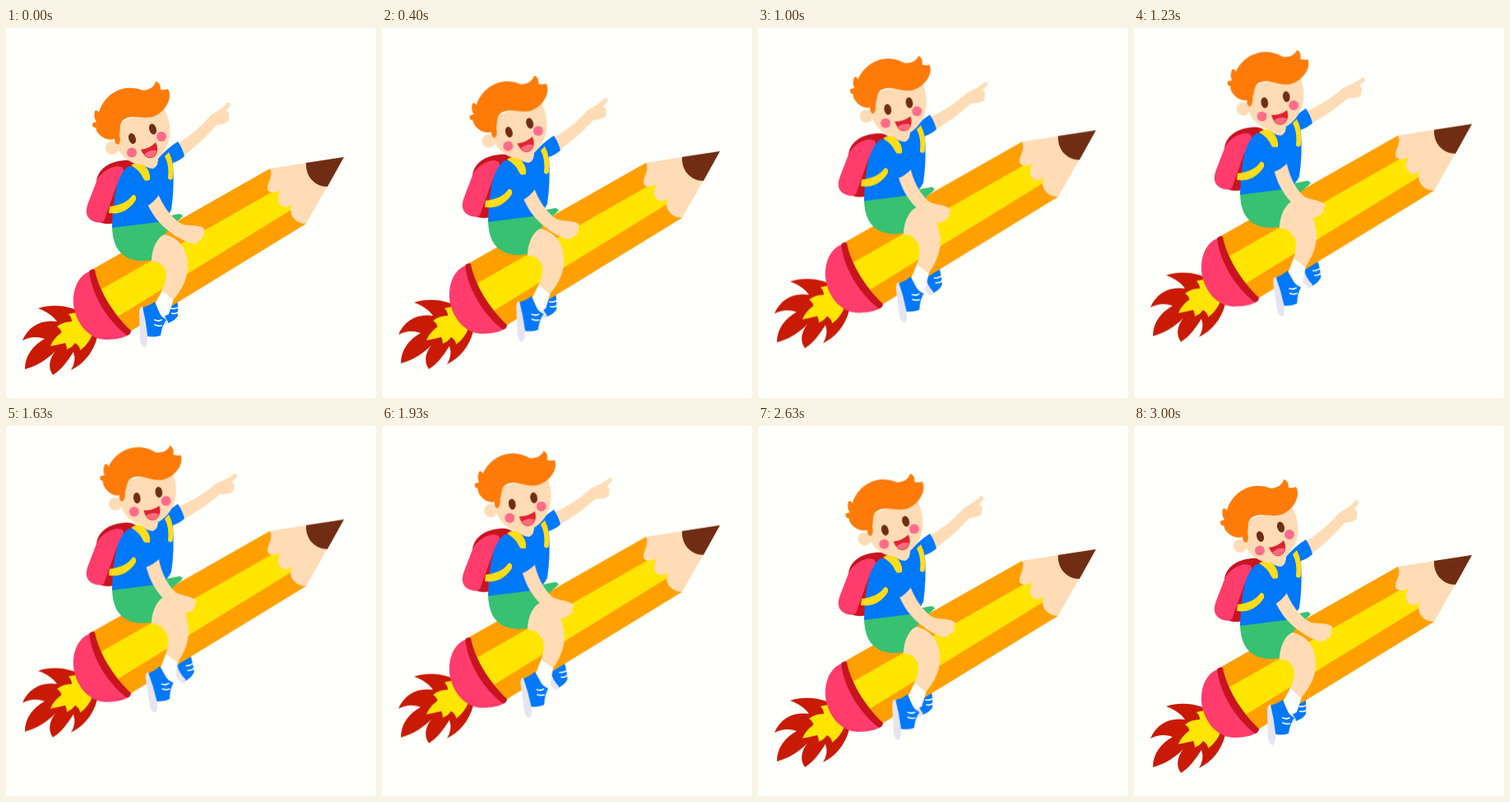
Write an HTML page that moves like this. It is 450 px wide and 450 px high and loops after 3.03 s.

```html
<!DOCTYPE html>
<html lang="en">
<head>
<meta charset="utf-8">
<title>Pencil rocket</title>
<style>
  html, body { margin: 0; width: 100%; height: 100%; overflow: hidden; background: #fffffb; }
  svg { display: block; width: 100vw; height: 100vh; }

  /* Every part swings between two poses on the same sine-like beat. */
  .part {
    --rise: 0px;
    --turn: 0deg;
    transform-box: view-box;
    animation: swing 1515ms cubic-bezier(.364, 0, .636, 1) infinite alternate;
  }
  @keyframes swing {
    from { transform: none; }
    to { transform: translateY(var(--rise)) rotate(var(--turn)); }
  }
  #rider { --rise: -44px; }
  #head { --turn: 10deg; transform-origin: 177px 166px; }
  #farArm { --turn: 9deg; transform-origin: 205px 150px; }
  #nearArm { --turn: 12deg; transform-origin: 176px 205px; }
  #shin { --turn: -7deg; transform-origin: 205px 283px; }
  #farFoot { --turn: -10.5deg; --rise: -6px; transform-origin: 209px 240px; }

  .skin { fill: #ffdcb5; }
  .blue { fill: #0078fa; }
  .green { fill: #37c171; }
  .hair { fill: #ff7b09; }
  .orange { fill: #ffa000; }
  .yellow { fill: #ffe500; }
  .strap { fill: #ffdd17; }
  .pink { fill: #ff3c6c; }
  .crimson { fill: #c8141e; }
  .brown { fill: #702d14; }
  .fire { fill: #c91a05; }
  .white { fill: #fff; }
  .sole { fill: #e6e4ee; }
  .cheek { fill: #ff6c8a; }
  .lace { fill: none; stroke: #fff; stroke-width: 1.8; stroke-linecap: round; }
</style>
</head>
<body>
<svg viewBox="0 0 450 450" aria-label="A boy riding a pencil rocket">
  <g id="rider" class="part">

    <g id="farFoot" class="part">
      <path class="blue" d="M188 335L208 328Q210 339 209 350Q207 355 197 359L189 354Z"/>
      <path class="sole" d="M185 337Q188 333 190 338Q191 349 197 357Q197 362 192 361Q184 352 185 337Z"/>
      <path class="lace" d="M201 341q4 1 8-1M202 347q4 1 7-1"/>
    </g>

    <!-- exhaust -->
    <path class="fire" d="M98 350C84 339 60 334 39 341C50 345 57 350 62 357C43 354 27 363 20 380
      C30 375 38 375 47 378C33 386 23 398 23 415C38 411 50 403 60 393C52 403 51 414 57 422
      C67 416 75 405 82 394Q86 405 79 416C94 409 106 395 111 376Z"/>
    <path class="yellow" d="M100 350C93 346 86 345 76 348C79 351 80 354 80 357C73 357 67 359 62 363
      C66 366 68 369 67 371C61 375 57 380 54 387C61 386 67 384 72 383Q74 387 74 391
      C79 389 82 386 84 383Q90 387 90 392C97 387 102 380 105 373Z"/>

    <!-- pencil -->
    <path class="orange" d="M106 293L321 171L365 238L151 369Q115 337 106 293Z"/>
    <path class="yellow" d="M110 321L333 194L352 218L131 354Z"/>
    <path class="skin" d="M321 171L411 157L365 238C352 238 342 227 348 213Q344 219 337 217
      C330 214 329 206 334 197Q326 203 319 198C315 190 326 182 321 171Z"/>
    <path class="brown" d="M365 164L411 157L391 193C375 193 364 180 365 164Z"/>
    <path class="pink" d="M102 296C87 301 79 321 83 342C88 364 104 379 122 379C136 379 146 376 150 372
      C127 353 109 325 105 296Z"/>
    <path class="crimson" d="M101 296Q104 292 108 294C112 317 130 348 152 368Q152 373 147 374
      C123 355 105 326 101 296Z"/>

    <!-- backpack -->
    <path class="crimson" d="M110 186C112 172 124 163 143 161Q155 160 160 166L136 236Q122 241 112 235Z"/>
    <path class="pink" d="M142 170C146 176 138 185 134 193L119 235Q114 238 109 236C96 232 96 222 101 210
      L111 184C119 172 134 165 142 170Z"/>

    <g id="farArm" class="part">
      <path class="skin" d="M202 145C220 134 237 121 248 107C254 102 264 98 269 91Q273 89 273 94
        L268 101Q273 104 271 108Q273 113 268 115Q262 118 256 118C244 132 230 145 213 158Z"/>
    </g>

    <path class="green" d="M129 240L185 231L211 226Q217 228 213 231Q199 242 191 254Q181 266 178 282
      Q161 285 149 280Q129 271 129 240Z"/>

    <!-- shirt -->
    <path class="blue" d="M149 168Q165 170 184 160Q195 147 209 138Q215 147 217 156Q210 162 203 164
      Q205 195 201 221Q196 232 185 236L129 243Q130 207 136 188Q141 174 149 168Z"/>
    <path class="skin" d="M164 164L185 156Q186 168 179 171Q171 171 164 164Z"/>
    <path class="strap" d="M152 167Q160 161 166 165Q177 174 175 186Q170 188 167 183Q163 173 152 167Z"/>
    <path class="strap" d="M193 156L198 151Q205 164 203 182Q201 187 197 183Q199 167 193 156Z"/>
    <path class="strap" d="M126 217C138 216 149 211 154 203Q159 202 158 209C150 222 138 227 125 225Z"/>

    <!-- near leg -->
    <path class="skin" d="M177 284C177 269 184 254 193 251C211 256 220 268 221 286L205 299L193 293Q188 283 177 284Z"/>
    <g id="shin" class="part">
      <path class="white" d="M191 317L181 336L190 352L198 348L204 329Z"/>
      <path class="skin" d="M191 286C197 298 195 307 190 319L203 331C215 317 222 303 221 286Q207 273 191 286Z"/>
      <path class="blue" d="M166 340Q174 338 181 333L186 345Q188 351 195 355Q190 361 188 374Q179 377 169 374Z"/>
      <path class="sole" d="M162 345Q163 338 166 339Q170 355 172 373Q173 385 169 388Q164 388 163 379Z"/>
      <path class="lace" d="M181 355q5 2 8 0M181 361q4 2 8 1"/>
    </g>

    <g id="head" class="part">
      <circle class="skin" cx="129" cy="146" r="8"/>
      <path class="skin" d="M133 118L188 92C197 103 201 120 199 133C196 150 183 164 168 166
        C152 167 139 156 135 144Z"/>
      <path class="hair" d="M137 142Q132 141 132 135Q122 138 113 129Q110 126 109 121Q105 122 105 116
        Q107 115 110 114Q106 108 108 101Q111 99 113 103C117 88 129 76 146 73Q157 72 167 76
        C175 75 181 71 182 65Q188 66 188 75Q193 76 197 74C203 84 195 101 181 107
        C169 112 156 105 146 110C136 114 140 123 138 130Q140 137 137 142Z"/>
      <g class="brown">
        <ellipse cx="153.5" cy="134.5" rx="4.3" ry="6.6" transform="rotate(-18 153.5 134.5)"/>
        <ellipse cx="178.5" cy="123" rx="4.3" ry="6.6" transform="rotate(-18 178.5 123)"/>
      </g>
      <g class="cheek">
        <circle cx="153" cy="151.5" r="6"/>
        <circle cx="189" cy="132" r="6"/>
      </g>
      <path fill="#df2231" d="M164 148Q176 146 182 139Q187 149 181 156Q171 163 164 148Z"/>
      <path fill="#ff6c7e" d="M168 154Q174 148 183 149Q183 153 180 156Q174 160 168 154Z"/>
    </g>

    <g id="nearArm" class="part">
      <path class="skin" d="M169 208L184 199C190 215 200 230 213 238C222 242 230 238 240 243
        Q243 246 239 248Q243 251 239 254Q239 258 235 258Q233 263 226 262
        C212 258 199 249 189 239C180 230 174 219 169 208Z"/>
      <path class="blue" d="M160 188L179 184L186 203Q180 212 171 217Q164 211 160 199Z"/>
    </g>
  </g>
</svg>
</body>
</html>
```
